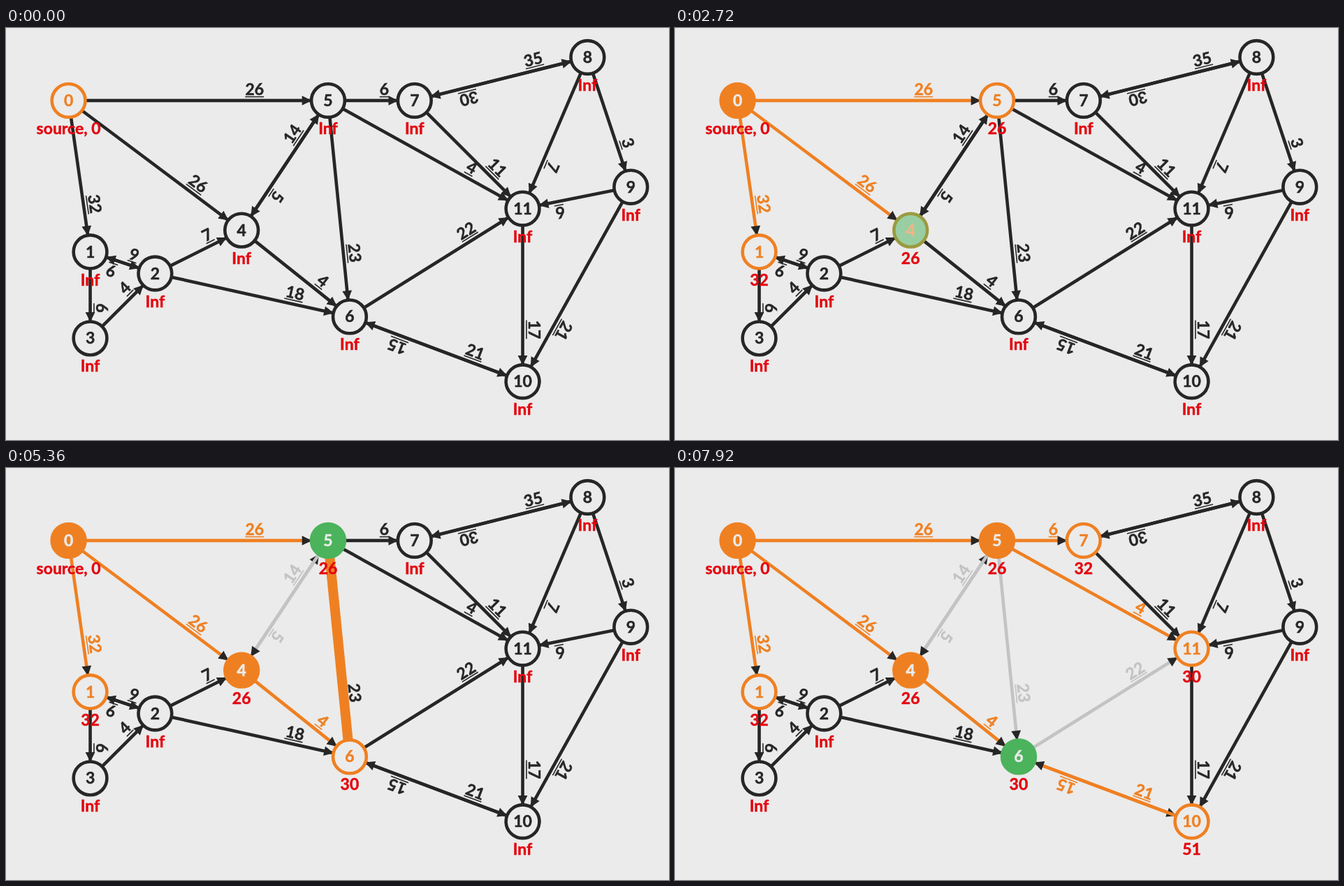
Recreate the animation shown at these times as an HTML page. Size 949 by 590 pixels, loop 8 s.

```html
<!DOCTYPE html>
<html lang="en">
<head>
<meta charset="utf-8">
<title>Shortest paths</title>
<style>
  html, body { margin: 0; width: 100%; height: 100%; overflow: hidden; background: #ebebeb; }
  svg { display: block; width: 949px; height: 590px; }
  text { font: 700 23px Lato, "Open Sans", sans-serif; text-anchor: middle; stroke-width: 0.5px; }
  .dist { fill: #e3060f; stroke: #e3060f; }
  .head { fill: #262626; }
</style>
</head>
<body>
<svg id="stage" viewBox="0 0 949 590"></svg>
<script>
const LOOP = 8000, START = 495, STEP = 415, FADE = 300, HOLD = 335;
const GRID = 30.95, LEFT = 89.6, TOP = 42, RIM = 24.8, WIDTH = 4.6;
const BG = [235, 235, 235], DARK = [38, 38, 38], ORANGE = [239, 128, 34];
const GREEN = [75, 179, 92], GREY = [195, 195, 195];

// one line per vertex: grid place, then target:weight for each edge
const graph = `0,2 1:32 4:26 5:26
1,9 2:9 3:6
4,10 1:9 4:7 6:18
1,13 2:4
8,8 5:14 6:4
12,2 4:5 6:23 7:6 11:4
13,12 10:21 11:22
16,2 8:35 11:11
24,0 7:30 9:3 11:7
26,6 10:21 11:6
21,15 6:15
21,7 10:17`.split("\n").map(row => {
  const [place, ...out] = row.split(" ");
  const [col, line] = place.split(",");
  return {
    x: LEFT + col * GRID,
    y: TOP + line * GRID,
    out: out.map(s => s.split(":").map(Number))
  };
});

// Dijkstra's algorithm, written down as one timed step per action
function plan() {
  const dist = graph.map((_, i) => i ? Infinity : 0);
  const open = new Set(graph.keys()), steps = [];
  const push = step => steps.push({ at: START + steps.length * STEP, ...step });
  while (open.size) {
    const a = [...open].reduce((m, i) => dist[i] < dist[m] ? i : m);
    open.delete(a);
    push({ node: a, look: active });
    for (const [b, weight] of graph[a].out) {
      const better = dist[a] + weight < dist[b];
      if (better) dist[b] = dist[a] + weight;
      push({ from: a, node: b, better, dist: dist[b], look: better && reached });
    }
    push({ node: a, look: done });
  }
  return steps.filter(s => s.at < LOOP);
}

const plain = { fill: BG, ring: DARK, text: DARK };
const reached = { fill: BG, ring: ORANGE, text: ORANGE };
const active = { fill: GREEN, ring: GREEN, text: BG };
const done = { fill: ORANGE, ring: ORANGE, text: BG };
const steps = plan();

const stage = document.getElementById("stage");
function set(el, attrs) {
  for (const k in attrs) el.setAttribute(k, attrs[k]);
}
function add(parent, tag, attrs, text = "") {
  const el = document.createElementNS("http://www.w3.org/2000/svg", tag);
  set(el, attrs);
  el.textContent = text;
  return parent.appendChild(el);
}
const rgb = c => `rgb(${c.map(Math.round)})`;
const paint = (el, c) => set(el, { fill: rgb(c), stroke: rgb(c) });
const mix = (a, b, p) => a.map((v, i) => v + (b[i] - v) * p);
const blend = (a, b, p) => ({
  fill: mix(a.fill, b.fill, p), ring: mix(a.ring, b.ring, p), text: mix(a.text, b.text, p)
});
function ease(x) {
  x = Math.min(1, Math.max(0, x));
  return x < 0.5 ? 4 * x ** 3 : 1 - 4 * (1 - x) ** 3;
}

const edges = {};
function addEdge(a, b, weight) {
  const dx = graph[b].x - graph[a].x, dy = graph[b].y - graph[a].y;
  const turn = Math.atan2(dy, dx) * 180 / Math.PI;
  const place = `translate(${graph[a].x} ${graph[a].y}) rotate(${turn})`;
  const to = Math.hypot(dx, dy) - RIM, mid = RIM + (to - RIM) * 0.75;
  const half = 6.7 * String(weight).length;
  const g = add(stage, "g", { transform: place });
  const line = add(g, "line", { x1: RIM, x2: to, "stroke-width": WIDTH });
  add(g, "path", { class: "head", d: `M${to + 1.4} 0l-13.9 -6.9v13.8z` });
  const label = add(g, "text", { x: mid, y: -8 }, weight);
  const under = add(g, "line", { x1: mid - half, x2: mid + half, y1: -5.4, y2: -5.4, "stroke-width": 1.6 });
  edges[a + ">" + b] = { parts: [line, label, under], place, to };
}
graph.forEach((v, a) => v.out.forEach(([b, weight]) => addEdge(a, b, weight)));

const trail = add(stage, "line", { stroke: rgb(ORANGE), "stroke-width": 14 });

const nodes = graph.map(({ x, y }, i) => ({
  ring: add(stage, "circle", { cx: x, cy: y, r: 23.9, "stroke-width": WIDTH }),
  text: add(stage, "text", { x, y: y + 8 }, i)
}));
graph.forEach(({ x, y }, i) => {
  nodes[i].dist = add(stage, "text", { class: "dist", x, y: y + 48 });
});

function draw(t) {
  const looks = graph.map((_, i) => i ? plain : reached);
  const dists = graph.map((_, i) => i ? "Inf" : "source, 0");
  const tints = {};
  let edge = null, grown = 0;

  for (const s of steps.filter(s => s.at <= t)) {
    const age = t - s.at, p = ease(age / FADE);
    if (s.look) looks[s.node] = blend(looks[s.node], s.look, p);
    if (s.better) dists[s.node] = s.dist;
    if (s.from === undefined) continue;
    const key = s.from + ">" + s.node;
    if (age < HOLD) {
      edge = edges[key];
      grown = p;
    } else {
      tints[key] = s.better ? ORANGE : GREY;
      // a shortest-path edge colours its way back too
      if (s.better) tints[s.node + ">" + s.from] = ORANGE;
    }
  }

  for (const key in edges) edges[key].parts.forEach(el => paint(el, tints[key] || DARK));
  nodes.forEach((n, i) => {
    set(n.ring, { fill: rgb(looks[i].fill), stroke: rgb(looks[i].ring) });
    paint(n.text, looks[i].text);
    n.dist.textContent = dists[i];
  });
  set(trail, { visibility: edge ? "visible" : "hidden" });
  if (edge) {
    set(trail, { transform: edge.place, x1: RIM, x2: RIM + (edge.to - RIM) * grown });
  }
}

const begin = performance.now();
function tick() {
  draw((performance.now() - begin) % LOOP);
  requestAnimationFrame(tick);
}
tick();
</script>
</body>
</html>
```
